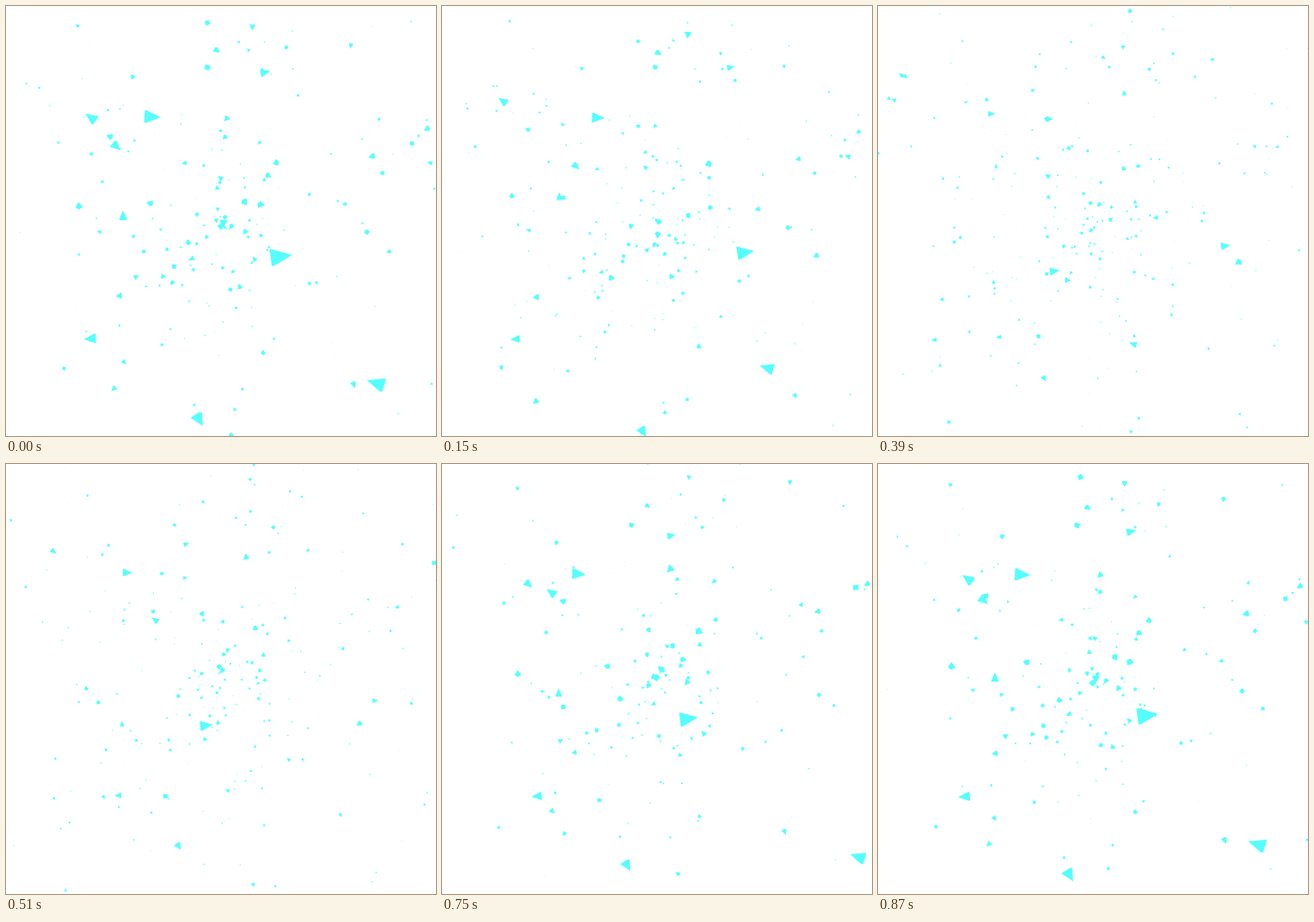
Animation of 500 by 500 pixels, one loop 0.9 s. Source, as an HTML page with a canvas:

```html
<!DOCTYPE html>
<html lang="en">
<head>
<meta charset="utf-8">
<title>Flying pyramids</title>
<style>
html, body { margin: 0; width: 100%; height: 100%; overflow: hidden; background: #fff; }
canvas { display: block; }
</style>
</head>
<body>
<canvas id="stage" width="500" height="500"></canvas>
<script>
const ctx = document.getElementById('stage').getContext('2d');
const SIZE = 500, CENTER = SIZE / 2, FOCAL = 600;
const LOOP = 900, STEP = 30, GROW = 900, SHRINK = 700;
const COUNT = 160;

let seed = 20;
function random(min = 0, max = 1) {
  seed = (seed * 1664525 + 1013904223) % 4294967296;
  return min + (max - min) * seed / 4294967296;
}

// Position at full size, travel per loop, length.
function makeLarge(x, y, vx, vy, length) {
  return { x, y, vx, vy, vz: Math.hypot(vx, vy) * 0.15, length, roll: 0, peak: 0 };
}

// Crowded towards the middle, flying in any direction in space.
function makeSmall() {
  const angle = random(0, 2 * Math.PI), radius = 340 * random() ** 1.3;
  const heading = random(0, 2 * Math.PI), speed = random(40, 220);
  const toward = random(-1, 1), across = speed * Math.sqrt(1 - toward ** 2);
  return {
    x: CENTER + Math.cos(angle) * radius,
    y: CENTER + Math.sin(angle) * radius,
    vx: Math.cos(heading) * across,
    vy: Math.sin(heading) * across,
    vz: toward * speed,
    length: 2 + 7 * random() ** 1.5,
    roll: random(0, Math.PI / 2),
    peak: random(-200, 200) + random(-200, 200),
  };
}

const pyramids = [
  makeLarge(321, 291, 201, -27, 24),
  makeLarge(171, 129, 66, 4, 18),
  makeLarge(429, 438, -303, -93, 20),
  makeLarge(98, 129, -177, -123, 14),
  makeLarge(225, 482, 54, 90, 15),
  makeLarge(97, 387, -78, 6, 13.5),
  makeLarge(129, 164, 159, 135, 12),
  makeLarge(136, 243, -1, -134, 11),
  makeLarge(302, 77, 210, -45, 11),
];
for (let i = 0; i < COUNT; i++) pyramids.push(makeSmall());

function addFace(points) {
  const [[ax, ay], [bx, by], [cx, cy]] = points;
  // One winding for every face keeps the silhouette solid.
  if ((bx - ax) * (cy - ay) < (by - ay) * (cx - ax)) points.reverse();
  points.forEach(([x, y], i) => i ? ctx.lineTo(x, y) : ctx.moveTo(x, y));
  ctx.closePath();
}

// A square pyramid with its tip pointing along its flight.
function drawPyramid(x, y, length, { vx, vy, vz, roll }) {
  const speed = Math.hypot(vx, vy, vz);
  const dx = vx / speed, dy = vy / speed, dz = vz / speed;
  const flat = Math.hypot(dx, dz);
  const reach = length * 0.4 * Math.SQRT2;
  const tip = [x + dx * length / 2, y + dy * length / 2];
  const base = [0, 1, 2, 3].map(i => {
    const turn = roll + (i + 0.5) * Math.PI / 2;
    const side = Math.cos(turn) * reach, up = Math.sin(turn) * reach;
    return [
      x - dx * length / 2 + (side * dz + up * dx * dy) / flat,
      y - dy * length / 2 - up * flat,
    ];
  });
  ctx.beginPath();
  base.forEach((corner, i) => addFace([tip, corner, base[(i + 1) % 4]]));
  addFace(base);
  ctx.fill();
}

function drawAt(pyramid, age) {
  const scale = age < 0 ? 1 + age / GROW : 1 - age / SHRINK;
  if (scale <= 0) return;
  const loops = age / LOOP;
  const z = 1 + pyramid.vz * loops / FOCAL;
  const x = CENTER + (pyramid.x - CENTER + pyramid.vx * loops) / z;
  const y = CENTER + (pyramid.y - CENTER + pyramid.vy * loops) / z;
  drawPyramid(x, y, pyramid.length * scale / z, pyramid);
}

function draw(time) {
  ctx.fillStyle = '#fff';
  ctx.fillRect(0, 0, SIZE, SIZE);
  ctx.fillStyle = '#5ff';
  for (const pyramid of pyramids) {
    const age = (time - pyramid.peak + LOOP) % LOOP;
    drawAt(pyramid, age);
    drawAt(pyramid, age - LOOP);
  }
}

const began = performance.now();
function tick() {
  const time = (performance.now() - began) % LOOP;
  draw(Math.floor(time / STEP) * STEP);
  requestAnimationFrame(tick);
}
tick();
</script>
</body>
</html>
```
